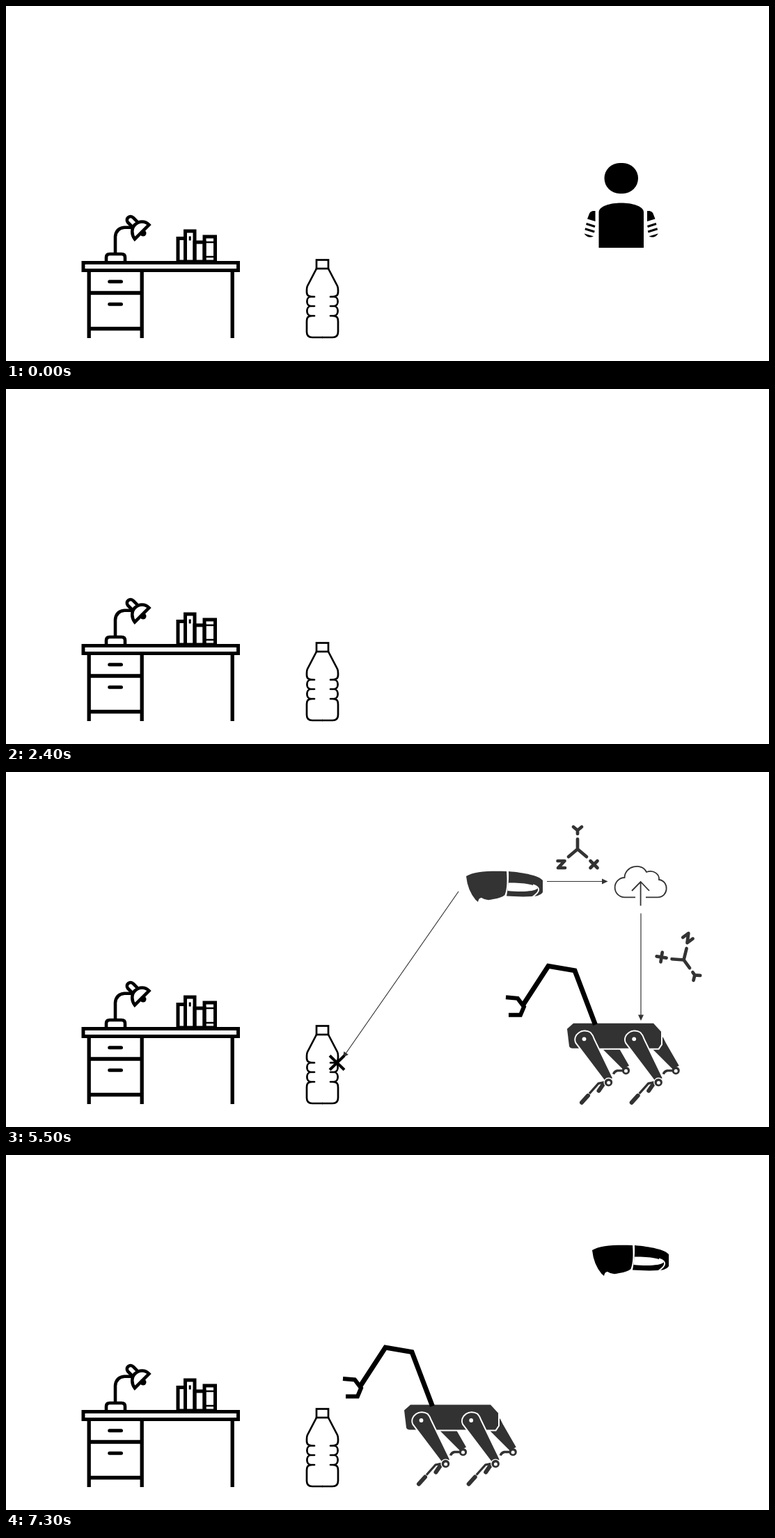
Write an HTML page with a canvas that moves like this. It is 1096 px wide and 511 px high and loops after 8 s.

```html
<!DOCTYPE html>
<html lang="en">
<head>
<meta charset="utf-8">
<title>Robot fetch demo</title>
<style>
html, body { margin: 0; width: 100%; height: 100%; overflow: hidden; background: #fff; }
canvas { display: block; width: 100%; height: 100%; }
</style>
</head>
<body>
<canvas id="stage" width="1096" height="511"></canvas>
<script>
const ctx = document.getElementById('stage').getContext('2d');
const LOOP = 8000, STEP = 100;

const clamp = v => Math.max(0, Math.min(1, v));
const ramp = (t, a, b) => clamp((t - a) / (b - a));
// The stage is white, so fading is a blend of the ink towards white.
const ink = (alpha, base = 0) => {
  const v = Math.round(255 + (base - 255) * alpha);
  return `rgb(${v},${v},${v})`;
};

function line(d, width, color = '#000', cap = 'butt', join = 'miter') {
  ctx.lineWidth = width;
  ctx.strokeStyle = color;
  ctx.lineCap = cap;
  ctx.lineJoin = join;
  ctx.stroke(new Path2D(d));
}

function fill(d, color = '#000') {
  ctx.fillStyle = color;
  ctx.fill(new Path2D(d));
}

function dot(x, y, r, color = '#000') {
  ctx.fillStyle = color;
  ctx.beginPath();
  ctx.arc(x, y, r, 0, Math.PI * 2);
  ctx.fill();
}

function box(x1, y1, x2, y2, width) {
  ctx.lineWidth = width;
  ctx.strokeStyle = '#000';
  ctx.lineJoin = 'miter';
  ctx.strokeRect(x1, y1, x2 - x1, y2 - y1);
}

function at(x, y, draw) {
  ctx.save();
  ctx.translate(x, y);
  draw();
  ctx.restore();
}

function mirrored(axis, draw) {
  draw();
  ctx.save();
  ctx.translate(axis * 2, 0);
  ctx.scale(-1, 1);
  draw();
  ctx.restore();
}

// Arrow wiped on from its tail; shown is the visible share of its length.
function arrow(x1, y1, x2, y2, width, headLen, headHalf, shown, color) {
  if (shown <= 0) return;
  const len = Math.hypot(x2 - x1, y2 - y1);
  ctx.save();
  ctx.translate(x1, y1);
  ctx.rotate(Math.atan2(y2 - y1, x2 - x1));
  ctx.beginPath();
  ctx.rect(-2, -20, (len + 4) * shown, 40);
  ctx.clip();
  line(`M0,0 H${len - headLen + 1}`, width, color);
  fill(`M${len},0 l${-headLen},${-headHalf} v${headHalf * 2} Z`, color);
  ctx.restore();
}

function desk() {
  box(111, 369.5, 333.5, 380.5, 5);
  line('M119.2,383 V478 M195.2,383 V478 M325.2,383 V478 M119,413 H195 M119,464.5 H195', 5.3);
  line('M148.7,396.8 H165.5 M148.7,429.3 H165.5', 5, '#000', 'round');
  line('M144,368 V362 Q144,357 149,357 H166 Q171,357 171,362 V368', 4.6);
  line('M157,356 V332 Q158,320 170,318.7 H181', 4.6);
  line('M181.5,318 L175,311.5 C171,306 178,300 183,304.8 L189,311', 4.6);
  line('M185,335.5 C180,329 180,320 185,315 C191,309 200,309 205.5,315 Z', 4.6);
  dot(197, 327, 4.5);
  box(247, 334.5, 257.5, 368, 5);
  box(257.5, 324, 271, 368, 5);
  box(271, 340, 285, 368, 5);
  box(285, 332, 300.5, 368, 5);
  line('M264.2,331.5 V337.5', 3);
  line('M285,340 H300 M285,361 H300', 2.6);
}

function bottle() {
  box(446, 365.5, 463, 378, 2.7);
  mirrored(454.5, () => line(
    'M446,378 L433,403 Q432,405 432,409 V412 C432,418 437,418.5 443,418.5 ' +
    'H438 C430.5,418.5 430.5,432 438,432 H443 H438 C430.5,432 430.5,446 438,446 ' +
    'H443 H440 C433,446 432,449 432,454 V469 Q432,477 440,477 H455', 2.7, '#000', 'butt', 'round'));
}

function person(color) {
  ctx.fillStyle = color;
  ctx.beginPath();
  ctx.roundRect(859.5, 226, 48.5, 44, 22);
  ctx.fill();
  fill('M851.5,348 V297 C851.5,288 868,283.5 883.7,283.5 S916,288 916,297 V348 Z', color);
  mirrored(883.75, () => {
    fill('M846.5,295 H843 Q838.5,296 837.5,300 L835,306.5 L846.5,310 Z', color);
    line('M833.5,313.5 L846,317.5 M831.8,320.8 L845.3,325', 3, color);
    fill('M830.5,327.5 L844,331.5 Q836,335.5 830.5,327.5 Z', color);
  });
}

function question(shown, color) {
  if (shown <= 0) return;
  ctx.save();
  if (shown < 1) {
    // Random horizontal bars
    ctx.beginPath();
    for (let y = 256; y < 344; y++) {
      const h = Math.abs(Math.sin(y * 12.9898) * 43758.5453) % 1;
      const size = clamp((shown - h) * 4);
      if (size > 0) ctx.rect(636, y, 60, size);
    }
    ctx.clip();
  }
  line('M648,280 C649,260 684,260 684,284 C684,298 666,298 666,318', 15, color);
  dot(666, 334, 7.8, color);
  ctx.restore();
}

function headset(color) {
  fill('M661,150 C672,143 695,142 719,143 C720,155 720,168 716.5,177 Q712,181 700,183 ' +
    'Q690,186 683,181 Q679,181 678,187 L674.5,184 Q663,170 661,150 Z', color);
  fill('M722,143 C745,145 765,149 771,156 V173 C768,178 760,179 756,179 ' +
    'C742,180 728,179 719,178.5 C721,169 722.5,158 722,143 Z', color);
  fill('M721.5,159.5 C748,159 762,163 763.5,167.5 C760,172 740,173 720.5,171 Z', '#fff');
  line('M757,162.5 C768,166 768,172 756,180', 2, '#fff');
}

function cloud(color) {
  line('M904,180.3 H889 A14,14 0 0 1 888.5,152 C889,135 913,130 920,144 ' +
    'C931,140 939,148 938,155 C953,157 952,180.3 936,180.3 H919', 1.8, color);
  line('M911.6,158 V192.5 M899,171 L911.6,158 L924,171', 1.8, color);
}

// Axis icon around its own centre
function axes(color) {
  line('M0,-12 V2.5 L-13,13.5 M0,2.5 L13,13.5 M-6,-29.5 L0,-24.5 L6,-29.5 M0,-24.5 V-19.5 ' +
    'M-28.5,19.5 H-18.5 L-28,29.5 H-18 M18.5,19.5 L28.5,29.5 M28.5,19.5 L18.5,29.5',
    4.7, color, 'round', 'round');
}

function mark(color) {
  line('M465,408.3 L486,428.7 M486,408.3 L465,428.7', 4, color);
}

function rearLeg(color) {
  fill('M870,380 L889,382 L893,390 L912,423 L903,428 L875,400 Z', color);
  line('M905,430 H895 Q891,431 889.5,435', 3.4, color);
  dot(907.5, 430, 5.6, color);
  dot(907.5, 430.5, 2.5, '#fff');
}

function frontLeg(color) {
  line('M880,446 L868,448.5 L855,463', 3.2, color);
  line('M875,449.5 L868.5,459', 6, color, 'round');
  line('M853,466 L844,476', 6, color, 'round');
  const thigh = 'M836.5,390 C831,379 846,369 856,376 Q859,379 861,385 L888,441 L878,445 Z';
  line(thigh, 4, '#fff', 'butt', 'round');
  fill(thigh, color);
  dot(882.5, 447, 7, '#fff');
  dot(882.5, 447, 5.7, color);
  dot(882.7, 447.5, 2.5, '#fff');
  dot(847.5, 384.5, 2.9, '#fff');
}

function robot(alpha) {
  const color = ink(alpha, 50), arm = ink(alpha);
  for (const x of [0, 71.7]) at(x, 0, () => rearLeg(color));
  const body = 'M823,370 L832,362 H947 L958,374 V392 L954,398 H831 Q827,398 826,395 Z';
  line(body, 4, '#fff');
  fill(body, color);
  for (const x of [0, 71.7]) at(x, 0, () => frontLeg(color));
  line('M863.5,364 L834,286 L796,279.5 L760,335', 7, arm);
  line('M735,324.5 L752,326 L761,338 L756,350 H739', 6, arm);
}

// Distance walked to the left at each step of the walk
const WALK_START = 5300;
const walk = [0, 5, 17, 38, 66, 98, 131, 163, 193, 217, 231, 240, 246, 249.5, 251];
function walked(t) {
  const i = Math.round((t - WALK_START) / STEP);
  return walk[Math.max(0, Math.min(walk.length - 1, i))];
}

function askScene(t) {
  const alpha = ramp(t, 2400, 1800);
  if (alpha <= 0) return;
  const color = ink(alpha);
  question(ramp(t, 900, 1300), color);
  arrow(819.5, 313.5, 507, 405, 6.5, 20, 9.7, ramp(t, 300, 700), color);
  person(color);
}

function linkScene(t) {
  const alpha = ramp(t, 5900, 5400);
  if (alpha <= 0) return;
  const color = ink(alpha);
  headset(ink(alpha * ramp(t, 2400, 2600)));
  arrow(650, 172, 484, 411, 1.2, 8, 4, ramp(t, 3100, 3500), color);
  if (t < 3900) return;

  const shown = ramp(t, 3800, 4200);
  arrow(777, 157.5, 864.5, 157.5, 1.2, 8.5, 4, shown, color);
  cloud(ink(alpha * shown));
  arrow(912, 203.5, 912, 358, 1.2, 8.5, 4, shown, color);

  const swivel = ramp(t, 3760, 5200);
  ctx.save();
  ctx.translate(821, 108.5);
  ctx.scale(Math.sin(2.5 * Math.PI * swivel), 1);
  axes(ink(alpha * swivel));
  ctx.restore();

  const turn = 1 - (1 - ramp(t, 3760, 4760)) ** 2;
  ctx.save();
  ctx.translate(975, 272.5);
  ctx.rotate((144 + 90 * (1 - turn)) * Math.PI / 180);
  ctx.scale(turn, turn);
  axes(ink(alpha * turn));
  ctx.restore();
}

function render(t) {
  ctx.fillStyle = '#fff';
  ctx.fillRect(0, 0, 1096, 511);
  if (t < 2400) {
    askScene(t);
  } else {
    linkScene(t);
    const marked = ramp(t, 3100, 3500) * ramp(t, 7300, 6900);
    if (marked > 0) mark(ink(marked));
    const dx = walked(t);
    if (t > 2400) at(-dx, -dx / 100, () => robot(ramp(t, 2400, 2600)));
    if (t >= 7000) at(181, -13, () => headset(ink(ramp(t, 6900, 7300))));
  }
  desk();
  bottle();
}

const start = performance.now();
function tick() {
  const t = (performance.now() - start) % LOOP;
  render(Math.floor(t / STEP) * STEP);
  requestAnimationFrame(tick);
}
tick();
</script>
</body>
</html>
```
